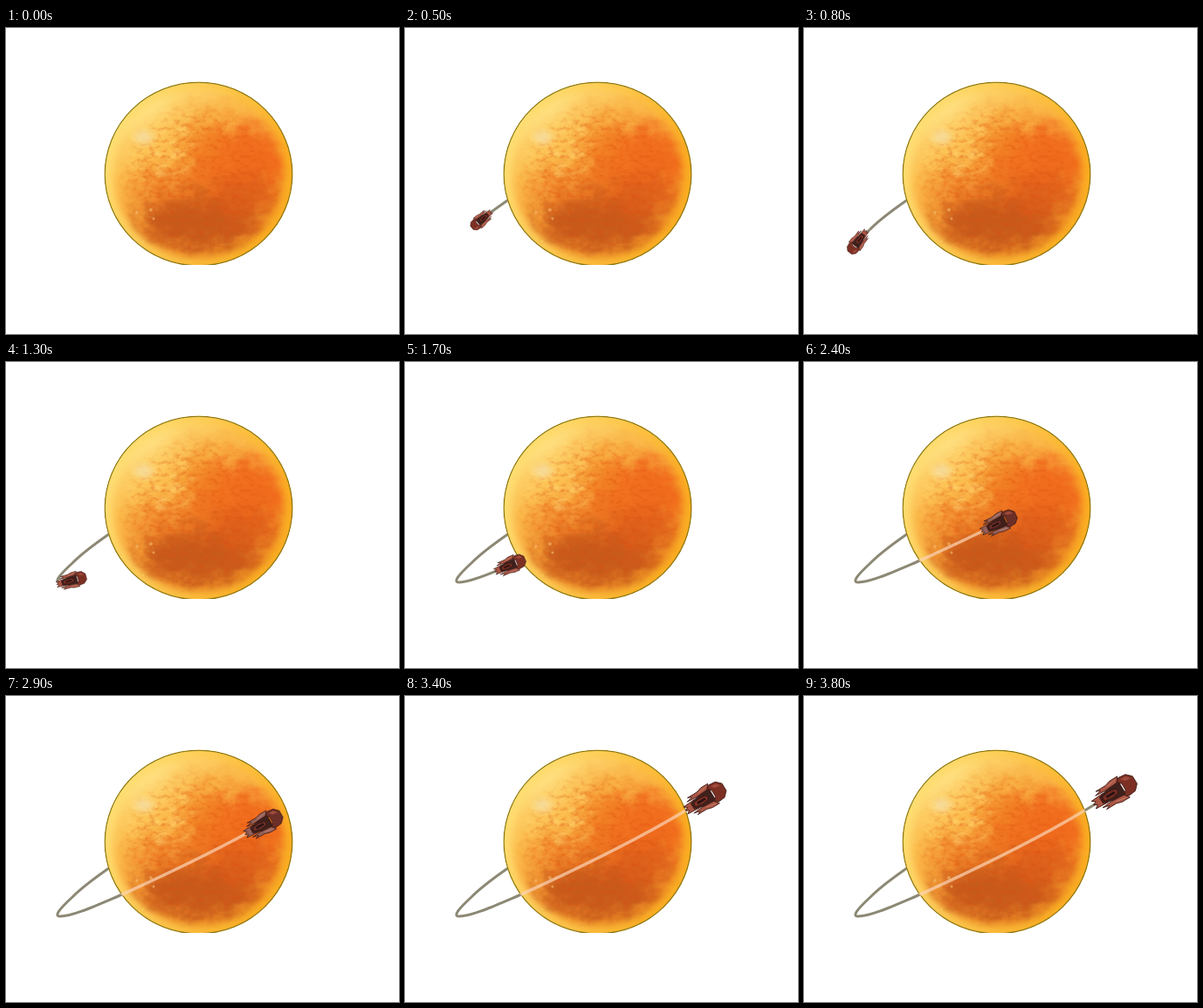
An HTML page that plays this animation: 450x350 px, repeating every 4.1 s.

```html
<!DOCTYPE html>
<html lang="en">
<head>
<meta charset="utf-8">
<title>Ship rounding a planet</title>
<style>
  html, body { margin: 0; width: 100%; height: 100%; overflow: hidden; background: #fff; }
  svg { display: block; width: 450px; height: 350px; }
  .trail { fill: none; stroke-width: 3; }
  #outer { stroke: #8c8874; }
  #inner { stroke: #fbd3b4; stroke-width: 3.6; opacity: .72; }
  .ship { --fin: #ab5645; --hull: #7c3024; }
  .ship.over { --fin: #93605a; --hull: #6c3029; }
</style>
</head>
<body>
<svg viewBox="0 0 450 350">
  <defs>
    <clipPath id="flat"><rect width="450" height="271"/></clipPath>
    <clipPath id="disc" clip-path="url(#flat)"><ellipse cx="220.5" cy="167" rx="108" ry="105.5"/></clipPath>
    <linearGradient id="base" x1=".15" y1=".1" x2=".75" y2="1">
      <stop offset="0" stop-color="#fee080"/>
      <stop offset=".3" stop-color="#fcbe4e"/>
      <stop offset=".6" stop-color="#f5962e"/>
      <stop offset="1" stop-color="#ee9024"/>
    </linearGradient>
    <filter id="cloud" x="-20%" y="-20%" width="140%" height="140%" color-interpolation-filters="sRGB">
      <feGaussianBlur stdDeviation="11" result="soft"/>
      <feTurbulence type="fractalNoise" baseFrequency=".06 .08" numOctaves="5" seed="7"/>
      <feDisplacementMap in="soft" scale="34" xChannelSelector="R" yChannelSelector="G"/>
    </filter>
    <filter id="light" x="0" y="0" width="100%" height="100%" color-interpolation-filters="sRGB">
      <feTurbulence type="fractalNoise" baseFrequency=".07 .1" numOctaves="5" seed="12"/>
      <feColorMatrix values="0 0 0 0 1  0 0 0 0 .85  0 0 0 0 .46  3 0 0 0 -1.4"/>
    </filter>
    <filter id="dark" x="0" y="0" width="100%" height="100%" color-interpolation-filters="sRGB">
      <feTurbulence type="fractalNoise" baseFrequency=".14 .22" numOctaves="4" seed="31"/>
      <feColorMatrix values="0 0 0 0 .86  0 0 0 0 .3  0 0 0 0 .05  0 3 0 0 -1.45"/>
    </filter>
    <filter id="blur" x="-30%" y="-30%" width="160%" height="160%"><feGaussianBlur stdDeviation="4"/></filter>
    <filter id="wide" x="-50%" y="-50%" width="200%" height="200%"><feGaussianBlur stdDeviation="10"/></filter>
    <linearGradient id="rim" x2="1" y2=".3">
      <stop offset="0" stop-color="#ffe47c"/>
      <stop offset=".5" stop-color="#fdcb50"/>
      <stop offset="1" stop-color="#fbb022"/>
    </linearGradient>

    <g id="body" stroke-linejoin="round" stroke="#3a1813" stroke-width=".8">
      <path fill="var(--fin)" d="M12-14 L2-14-5-12-18-12-13-10-21-8-8-7 8-8Z"/>
      <path fill="var(--fin)" d="M12 14 L2 14-5 12-18 12-13 10-21 8-8 7 8 8Z"/>
      <path fill="var(--fin)" d="M-12-6 L-28-5-24-2-28 0-24 2-28 5-12 6Z"/>
      <path fill="#40201c" d="M-18-4 L-6-7 10-8 V8 L-6 7-18 4Z"/>
      <path fill="var(--hull)" d="M8-9 L12-12 21-11 27-5 27 5 21 11 12 12 8 9 12 4 12-4Z"/>
      <path fill="var(--hull)" d="M-15-2.5 L-6-4 2-3 4 0 2 3-6 4-15 2.5Z"/>
      <path fill="#2a1214" stroke="none" d="M-11-1.5 H0 V1.5 H-11Z"/>
      <path fill="#a04c3c" stroke="none" d="M13-9 L20-9 24-4 17-5Z"/>
      <path fill="none" stroke="#c88672" d="M8-12 L-4-10M8 12 L-4 10"/>
    </g>
  </defs>

  <path id="outer" class="trail" d="M128 190 C112 201 92 214 76 230 C62 243 54 252 62 252 C76 252 100 241 133 227 C190 201 262 167 323 130 L364 105"/>
  <use id="back" class="ship" href="#body"/>

  <g clip-path="url(#disc)">
    <rect x="110" y="60" width="222" height="215" fill="url(#base)"/>
    <g filter="url(#cloud)">
      <ellipse cx="266" cy="152" rx="56" ry="42" fill="#f0641a" opacity=".85"/>
      <ellipse cx="224" cy="132" rx="26" ry="24" fill="#f08022" opacity=".75"/>
      <ellipse cx="208" cy="182" rx="66" ry="24" fill="#ec7420" opacity=".75"/>
      <ellipse cx="222" cy="224" rx="70" ry="32" fill="#c2541a" opacity=".9"/>
      <ellipse cx="272" cy="196" rx="38" ry="28" fill="#d85a1a" opacity=".75"/>
      <ellipse cx="236" cy="98" rx="30" ry="10" fill="#f6a038" opacity=".6"/>
    </g>
    <rect x="110" y="60" width="150" height="150" filter="url(#light)" opacity=".5" mask="url(#fade)"/>
    <rect x="110" y="60" width="222" height="215" filter="url(#dark)" opacity=".36" mask="url(#core)"/>
    <ellipse cx="158" cy="90" rx="40" ry="13" transform="rotate(-38 158 90)" fill="#ffe890" opacity=".65" filter="url(#wide)"/>
    <ellipse cx="158" cy="125" rx="10" ry="7" fill="#f4e2b0" opacity=".8" filter="url(#blur)"/>
    <g fill="#f8c878" opacity=".55">
      <circle cx="150" cy="211" r="1.8"/><circle cx="166" cy="208" r="2"/><circle cx="169" cy="218" r="1.5"/><circle cx="157" cy="244" r="1.6"/>
    </g>
    <ellipse cx="220.5" cy="167" rx="105.5" ry="103" fill="none" stroke="url(#rim)" stroke-width="13" filter="url(#blur)"/>
    <ellipse cx="220.5" cy="167" rx="107.4" ry="104.9" fill="none" stroke="#85730f" stroke-width="1.3"/>
  </g>
  <mask id="fade"><ellipse cx="172" cy="132" rx="46" ry="52" fill="#fff" filter="url(#wide)"/></mask>
  <mask id="core"><ellipse cx="222" cy="172" rx="82" ry="78" fill="#fff" filter="url(#wide)"/></mask>

  <g clip-path="url(#disc)"><path id="inner" class="trail"/></g>
  <use id="front" class="ship" href="#body"/>
</svg>
<script>
  const LOOP = 4100, START = 300, STEP = 100, LAST = 36, TURN = 100;
  const [outer, inner, back, front] = ['outer', 'inner', 'back', 'front'].map(id => document.getElementById(id));
  inner.setAttribute('d', outer.getAttribute('d'));

  // [step, value] pairs
  const distance = [[1, 12], [2, 32], [3, 50], [4, 65], [5, 77], [6, 86], [8, 97], [10, 104], [12, 116],
    [13, 128], [14, 142], [15, 158.5], [22, 272], [27, 353], [30, 391], [32, 410], [33, 415], [34, 419], [36, 424]];
  const size = [[1, .5], [6, .58], [15, .68], [22, .8], [27, .86], [32, .94], [36, 1]];

  function at(keys, k) {
    const i = Math.max(1, keys.findIndex(key => key[0] >= k));
    const [k0, v0] = keys[i - 1], [k1, v1] = keys[i];
    return v0 + (v1 - v0) * (k - k0) / (k1 - k0);
  }

  function draw(k) {
    const flying = k > 0, behind = k < 9;
    back.style.display = flying && behind ? '' : 'none';
    front.style.display = flying && !behind ? '' : 'none';
    outer.style.display = inner.style.display = flying ? '' : 'none';
    if (!flying) return;

    const s = at(distance, k), scale = at(size, k);
    const p = outer.getPointAtLength(s);
    const a = outer.getPointAtLength(s - 4), b = outer.getPointAtLength(s + 4);
    const angle = Math.atan2(b.y - a.y, b.x - a.x) * 180 / Math.PI;
    const ship = behind ? back : front;
    ship.setAttribute('transform', `translate(${p.x} ${p.y}) rotate(${angle}) scale(${scale})`);
    ship.classList.toggle('over', k > 17 && k < 30);

    const shown = Math.max(0, s - 23 * scale);
    outer.setAttribute('stroke-dasharray', `${shown} 999`);
    inner.setAttribute('stroke-dasharray', `0 ${TURN} ${Math.max(0, shown - TURN)} 999`);
  }

  let current = -1;
  function tick() {
    const t = performance.now() % LOOP;
    const k = t < START ? 0 : Math.min(LAST, Math.floor((t - START) / STEP) + 1);
    if (k !== current) draw(current = k);
    requestAnimationFrame(tick);
  }
  tick();
</script>
</body>
</html>
```
